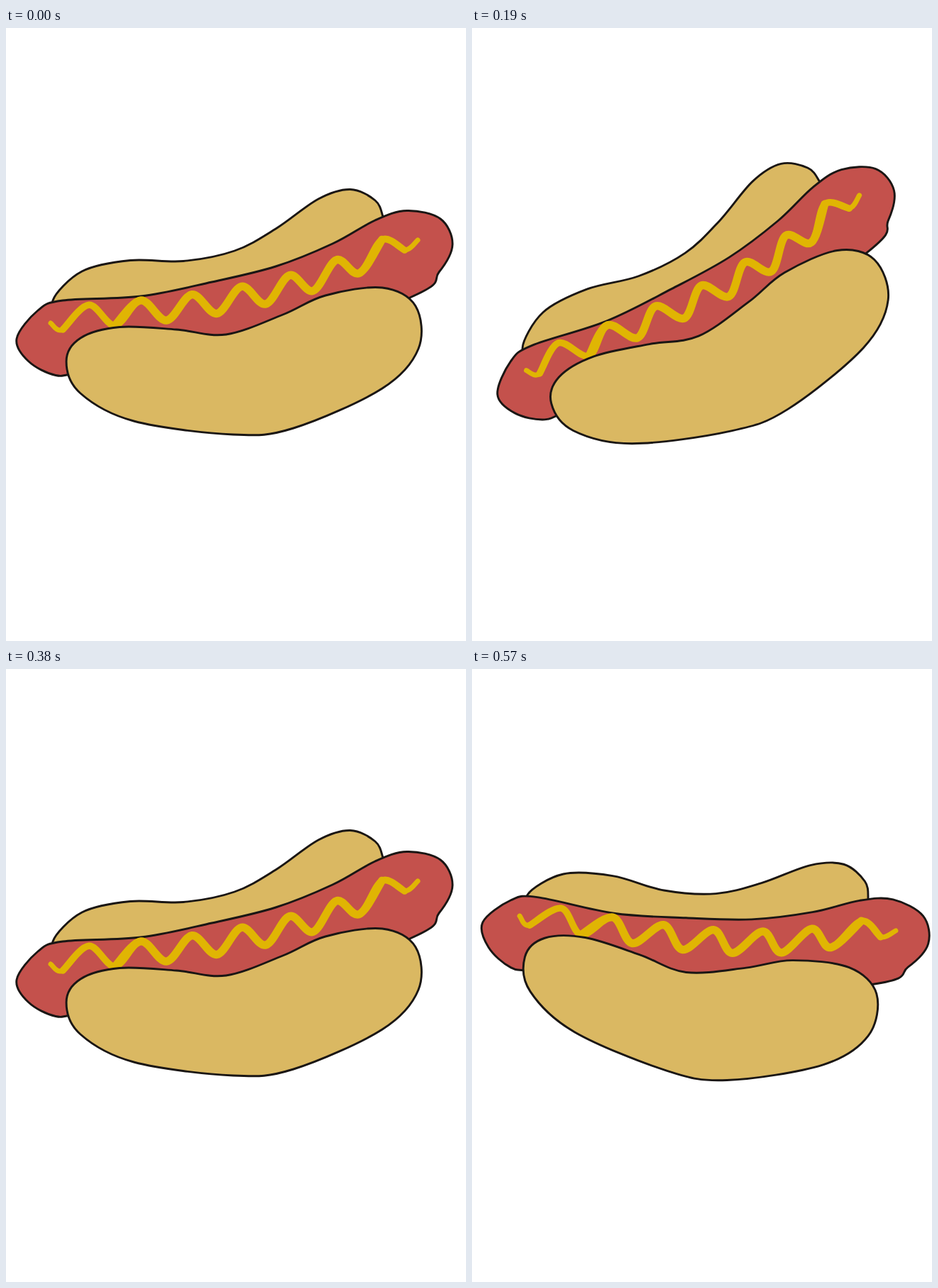
Recreate the animation shown at these times as an HTML page. Size 648 by 864 pixels, loop 760 ms.

```html
<!DOCTYPE html>
<html lang="en">
<head>
<meta charset="utf-8">
<title>Rocking hot dog</title>
<style>
  html, body { margin: 0; width: 100%; height: 100%; overflow: hidden; background: #fff; }
  svg { display: block; width: 100%; height: 100%; }
  path { stroke-linecap: round; stroke-linejoin: round; }
  .bun, .sausage { stroke: #1a1614; stroke-width: 2.9; }
  .bun { fill: #dab862; }
  .sausage { fill: #c4514c; }
  .mustard { fill: none; stroke: #e0b503; }
</style>
</head>
<body>
<svg viewBox="0 0 648 864"><g id="dog"></g></svg>
<script>
const dog = document.getElementById('dog');

const points = text => text.trim().split(/\s+/).map(p => p.split(',').map(Number));

// Smooth curve through all points (Catmull-Rom as cubic Béziers)
function curve(pts, closed) {
  const n = pts.length;
  const at = i => closed ? pts[(i + n) % n] : pts[Math.max(0, Math.min(n - 1, i))];
  let d = 'M' + pts[0];
  for (let i = 0; i < (closed ? n : n - 1); i++) {
    const [a, b, c, e] = [at(i - 1), at(i), at(i + 1), at(i + 2)];
    const out = b.map((v, k) => v + (c[k] - a[k]) / 6);
    const into = c.map((v, k) => v - (e[k] - b[k]) / 6);
    d += `C${out} ${into} ${c}`;
  }
  return closed ? d + 'Z' : d;
}

function add(cls, d, width) {
  const path = document.createElementNS('http://www.w3.org/2000/svg', 'path');
  path.setAttribute('class', cls);
  path.setAttribute('d', d);
  if (width) path.setAttribute('stroke-width', width);
  dog.append(path);
}

const backBun = points(`66,384 107,343 175,327.5 250,328.5 322,314 380,283 440,241
  485,227.5 520,243 531,266 535,290 420,345 250,390 90,400`);

const sausage = points(`15,438 45,398 80,384 190,378 290,358 380,336 460,304 520,271
  565,257.5 612,269 629,305 610,344 569,380 300,480 110,487 70,489.5 32,470`);

const frontBun = points(`85,470 105,437 160,421.5 240,425 310,432 390,404 450,377
  530,366 577,392 581,452 530,508 405,564 320,573 180,554 105,515`);

// Crests alternate below and above a spine that bends upwards to the right
const CRESTS = 15;
function crest(k) {
  const x = 80 + 34.4 * k + 11 * Math.sin(Math.PI * k / (CRESTS - 1));
  const spine = 409 - 2.8 * k - 0.0265 * k ** 3;
  return [x, spine + (k % 2 ? -16 : 16)];
}
const mustard = [[63, 416], ...Array.from({ length: CRESTS }, (_, k) => crest(k)), [580, 299]];

add('bun', curve(backBun, true));
add('sausage', curve(sausage, true));
// Thicker strokes over shorter spans taper the ends
add('mustard', curve(mustard), 7);
add('mustard', curve(mustard.slice(1, -1)), 9.5);
add('mustard', curve(mustard.slice(3, -2)), 11.3);
add('bun', curve(frontBun, true));

const HOLD = 190;
const SWING = 15;

// Hard steps through a quarter turn of a sine: level, up, level, down
function draw(ms) {
  const step = Math.floor(ms / HOLD) % 4;
  const tilt = -SWING * Math.round(Math.sin(step * Math.PI / 2));
  dog.setAttribute('transform', `rotate(${tilt} 323 398)`);
}

const start = performance.now();
function tick() {
  draw(performance.now() - start);
  requestAnimationFrame(tick);
}
tick();
</script>
</body>
</html>
```
